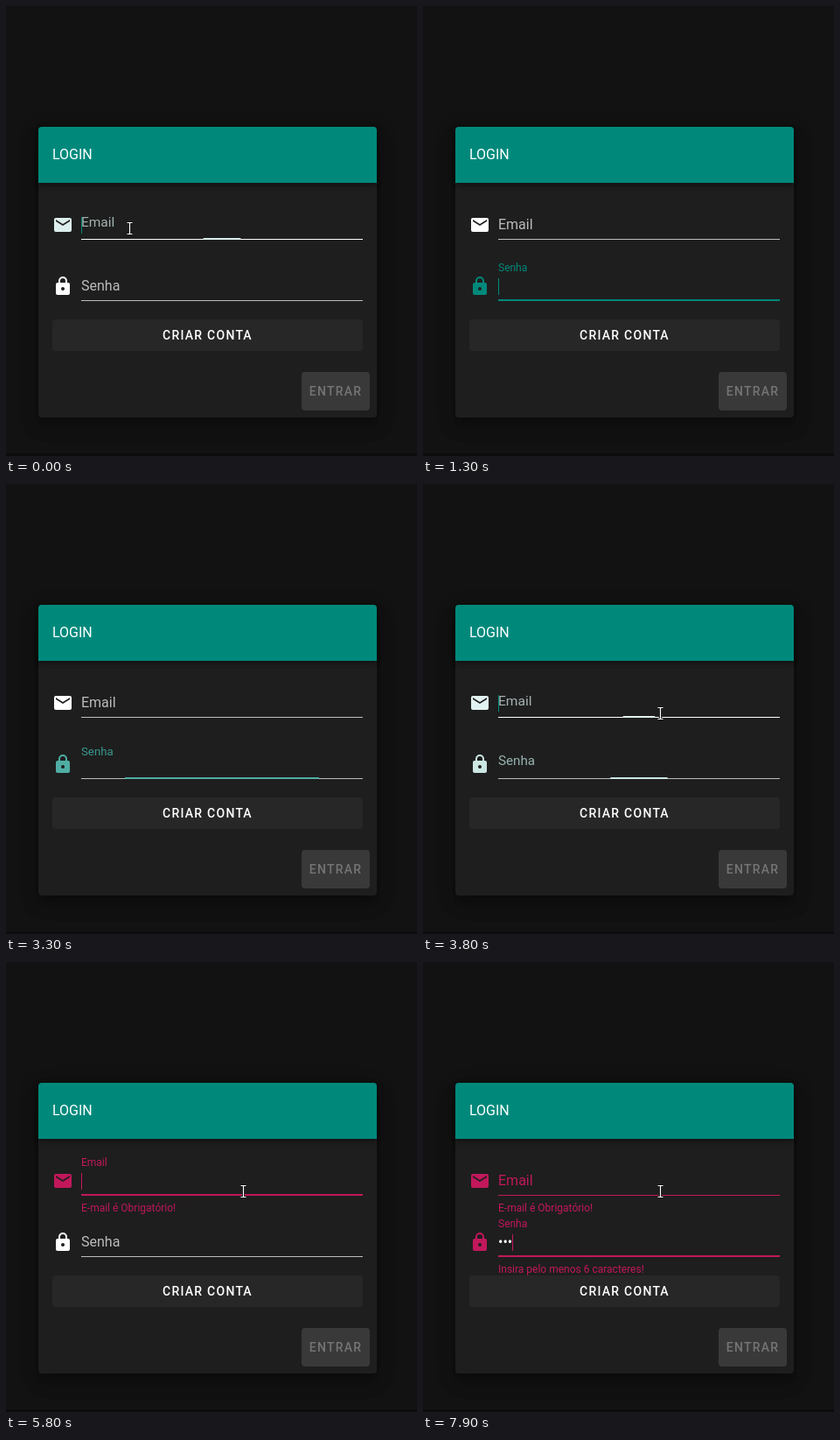
Animation, 470 px wide and 514 px high, one loop 8 s. Source, as an HTML page:

```html
<!DOCTYPE html>
<html lang="pt">
<head>
<meta charset="utf-8">
<title>Login</title>
<style>
  html, body { margin: 0; width: 100%; height: 100%; overflow: hidden; background: #121212; }
  body { position: relative; font: 16px/20px Roboto, sans-serif; color: #fff; }
  div, svg { position: absolute; box-sizing: border-box; white-space: pre; }
  .edge { left: 0; top: 511px; width: 470px; height: 3px; background: #0c0c0c; }
  .card { left: 37px; top: 138px; width: 387px; height: 332px; border-radius: 4px; background: #1e1e1e;
    box-shadow: 0 7px 8px -4px rgba(0,0,0,.2), 0 12px 17px 2px rgba(0,0,0,.14), 0 5px 22px 4px rgba(0,0,0,.12); }
  .bar { left: 0; top: 0; width: 387px; height: 64px; padding-left: 16px; line-height: 64px;
    border-radius: 4px 4px 0 0; background: #00897b;
    box-shadow: 0 2px 4px -1px rgba(0,0,0,.2), 0 4px 5px rgba(0,0,0,.14), 0 1px 10px rgba(0,0,0,.12); }
  .button { border-radius: 4px; font-size: 14px; font-weight: 500; letter-spacing: 1.25px; text-align: center; }
  .create { left: 16px; top: 220px; width: 355px; height: 36px; line-height: 36px; background: #272727; }
  .enter { left: 301px; top: 280px; width: 78px; height: 44px; line-height: 44px;
    background: rgba(255,255,255,.12); color: rgba(255,255,255,.3); }
  .field { left: 53px; width: 355px; height: 60px; }
  .icon { left: 0; top: 18px; width: 24px; height: 24px; fill: currentColor; }
  .label { left: 33px; top: 20px; transform-origin: 0 0; }
  .value { left: 33px; top: 20px; }
  .caret { top: 21px; width: 1px; height: 19px; }
  .rule { left: 33px; top: 46px; width: 322px; height: 1px; }
  .focus { left: 33px; top: 45px; width: 322px; height: 2px; background: currentColor; }
  .message { left: 33px; top: 55px; font-size: 12px; line-height: 12px; color: #c2185b; }
  #cursor { left: 0; top: 0; width: 1px; height: 1px; overflow: visible; fill: none; }
</style>
</head>
<body>
<div class="edge"></div>
<div class="card">
  <div class="bar">LOGIN</div>
  <div class="button create">CRIAR CONTA</div>
  <div class="button enter">ENTRAR</div>
</div>
<svg id="cursor">
  <path id="beam" d="M-3-6.5H3M0-6.5V6.5M-3 6.5H3" stroke="#111" stroke-width="3"/>
  <path d="M-3-6.5H3M0-6.5V6.5M-3 6.5H3" stroke="#fff" stroke-width="1.2"/>
</svg>
<script>
const LOOP = 8000, FADE = 300, BLINK = 610;
const WHITE = [255, 255, 255], MUTED = [188, 188, 188], TEAL = [0, 137, 123], PINK = [194, 24, 91];
const cursor = document.getElementById('cursor');

const fields = [
  {
    top: 220, label: 'Email', caretDelay: 0, errorAt: 4085,
    icon: 'M20 8L12 13L4 8V6L12 11L20 6M20 4H4C2.89 4 2 4.89 2 6V18A2 2 0 0 0 4 20H20A2 2 0 0 0 22 18V6C22 4.89 21.1 4 20 4Z',
    focus: [[-12, 520], [1960, 2560], [3790, 5960]],
    keys: [[4085, 'c'], [4880, 'cl'], [4990, 'clo'], [5620, '']],
    messages: [['Insira um e-mail válido!', 4085, 5600], ['E-mail é Obrigatório!', 5600, Infinity]]
  },
  {
    top: 290, label: 'Senha', caretDelay: 100, errorAt: 6420,
    icon: 'M12 17A2 2 0 0 0 14 15C14 13.89 13.1 13 12 13A2 2 0 0 0 10 15A2 2 0 0 0 12 17M18 8A2 2 0 0 1 20 10V20A2 2 0 0 1 18 22H6A2 2 0 0 1 4 20V10C4 8.89 4.9 8 6 8H7V6A5 5 0 0 1 17 6V8H18M12 3A3 3 0 0 0 9 6V8H15V6A3 3 0 0 0 12 3Z',
    focus: [[960, 1610], [3208, 3680], [5960, Infinity]],
    keys: [[6420, '•'], [6510, '••'], [6590, '•••']],
    messages: [['Insira pelo menos 6 caracteres!', 6420, Infinity]]
  }
];

// Each path lists time, x, y; the pointer is hidden between paths.
const pointerPaths = [
  [[0, 142, 254], [150, 142, 254], [450, 165, 268]],
  [[1700, 250, 243], [1900, 222, 253], [2480, 222, 253], [2620, 245, 268]],
  [[3600, 285, 248], [3780, 272, 262], [LOOP, 272, 262]]
];

// cubic-bezier(.25, .8, .5, 1), solved for time by bisection
function ease(ms) {
  const x = Math.min(1, Math.max(0, ms / FADE));
  const curve = (a, b, u) => 3 * a * u * (1 - u) ** 2 + 3 * b * u * u * (1 - u) + u ** 3;
  let low = 0, high = 1;
  for (let i = 0; i < 20; i++) {
    const mid = (low + high) / 2;
    if (curve(.25, .5, mid) < x) low = mid; else high = mid;
  }
  return curve(.8, 1, high);
}

const presence = (t, start, end) => ease(t - start) * (1 - ease(t - end));
const mix = (a, b, p) => a.map((v, i) => v + (b[i] - v) * p);
const rgb = c => `rgb(${c.map(Math.round)})`;

function add(parent, className, text = '') {
  const el = document.createElement('div');
  el.className = className;
  el.textContent = text;
  parent.append(el);
  return el;
}

function build(field) {
  const root = add(document.body, 'field');
  root.style.top = field.top + 'px';
  root.innerHTML = `<svg class="icon" viewBox="0 0 24 24"><path d="${field.icon}"/></svg>`;
  field.iconEl = root.firstChild;
  field.labelEl = add(root, 'label', field.label);
  for (const part of ['value', 'caret', 'rule', 'focus']) field[part + 'El'] = add(root, part);
  field.messageEls = field.messages.map(([text]) => add(root, 'message', text));
}

function drawField(field, t, hovered) {
  const active = Math.max(...field.focus.map(([a, b]) => presence(t, a, b)));
  const error = ease(t - field.errorAt);
  const tint = rest => rgb(mix(mix(rest, TEAL, active), PINK, error));

  field.iconEl.style.color = field.focusEl.style.color = tint(WHITE);
  field.labelEl.style.color = tint(MUTED);
  field.labelEl.style.transform = `translateY(${-18 * active}px) scale(${1 - active / 4})`;
  field.ruleEl.style.background = rgb(mix(hovered ? WHITE : MUTED, PINK, error));
  field.focusEl.style.transform = `scaleX(${active})`;

  const typed = field.keys.filter(([at]) => at <= t).pop();
  field.valueEl.textContent = typed ? typed[1] : '';

  const span = field.focus.find(([a, b]) => t >= a + field.caretDelay && t < b);
  const caret = field.caretEl.style;
  caret.visibility = 'hidden';
  if (span) {
    const lastInput = Math.max(span[0], typed ? typed[0] : span[0]);
    if (Math.floor((t - lastInput) / BLINK) % 2 === 0) caret.visibility = 'visible';
    caret.left = 33 + Math.floor(field.valueEl.getBoundingClientRect().width) + 'px';
    caret.background = rgb(mix(TEAL, PINK, error));
  }

  field.messages.forEach(([, start, end], i) => {
    const p = presence(t, start, end), style = field.messageEls[i].style;
    style.opacity = p;
    style.transform = p === 1 ? 'none' : `translateY(${-4 * (1 - p)}px)`;
  });
}

function pointerAt(t) {
  for (const path of pointerPaths) {
    const i = path.findIndex(([at]) => at > t);
    if (i < 1) continue;
    const [from, to] = [path[i - 1], path[i]];
    return mix(from, to, (t - from[0]) / (to[0] - from[0])).slice(1);
  }
}

function draw(now) {
  const t = now % LOOP;
  const point = pointerAt(t);
  cursor.style.visibility = point ? 'visible' : 'hidden';
  if (point) cursor.style.transform = `translate(${Math.round(point[0]) - .5}px, ${Math.round(point[1])}px)`;
  fields.forEach((field, i) => drawField(field, t, point && i === 0));
}

fields.forEach(build);
document.body.append(cursor);
const begin = performance.now();
function tick() {
  draw(performance.now() - begin);
  requestAnimationFrame(tick);
}
tick();
</script>
</body>
</html>
```
